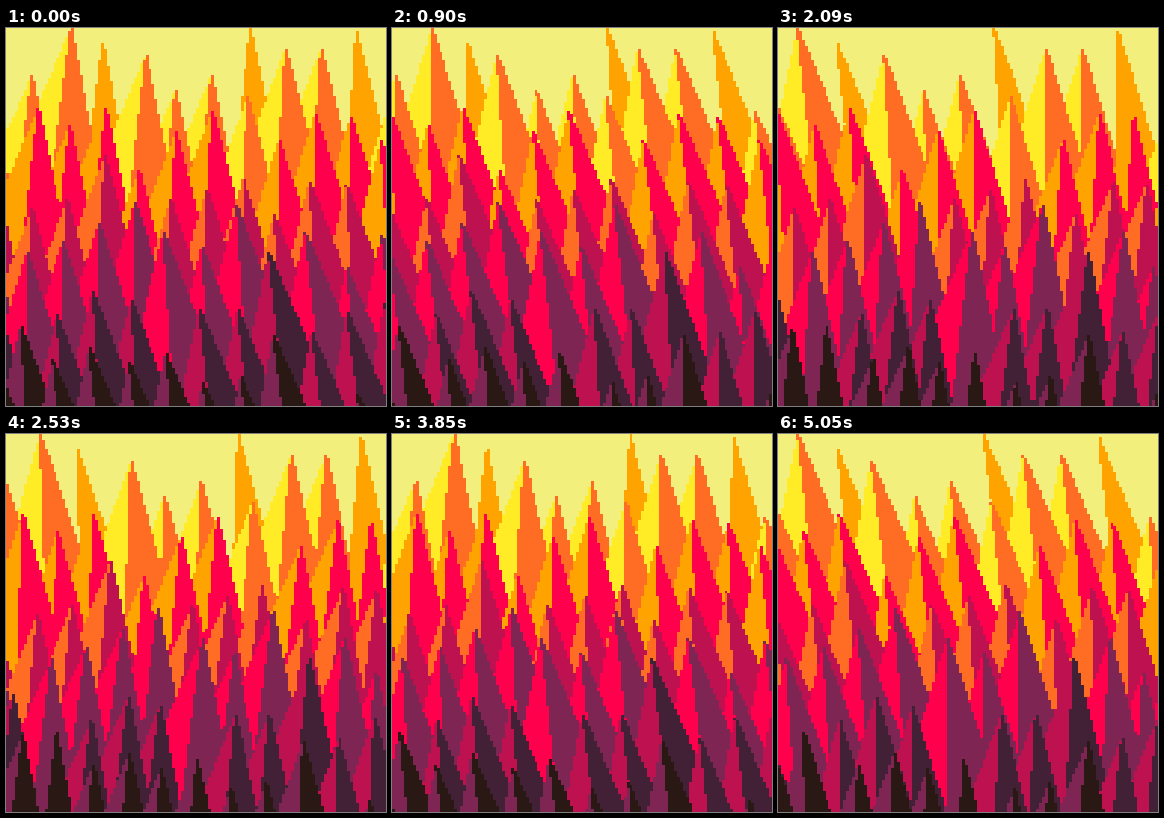
An HTML page with a canvas for the animation above (5.15 s loop, 380 by 378 pixels).

```html
<!DOCTYPE html>
<html>
<head>
<meta charset="utf-8">
<style>
  html, body { margin: 0; width: 100%; height: 100%; overflow: hidden; background: #f3ef7d; }
  canvas { display: block; width: 380px; height: 378px; image-rendering: pixelated; }
</style>
</head>
<body>
<canvas id="stage" width="128" height="128"></canvas>
<script>
const LOOP = 5150, SWAY_PERIOD = 3600, SIZE = 128;
const CELL_W = 380 / SIZE, CELL_H = 378 / SIZE;
const palette = ['#f3ef7d', '#ffec27', '#ffa300', '#ff6c24', '#ff004d',
                 '#be1250', '#7e2553', '#422136', '#291814'];

// Spikes stand on a skewed lattice; each row lists its first column and the tip heights.
const rows = [
  [-1, [80, 46, 0, 16]],
  [-1, [150, 80, 97, 80, 28, 62, 46, 0]],
  [-1, [225, 180, 172, 128, 142, 103, 82, 68, 22, 20, 4]],
  [-1, [259, 225, 214, 195, 175, 172, 163, 152, 112, 85, 88, 82]],
  [-1, [300, 298, 287, 262, 272, 205, 220, 178, 187, 155, 157, 112]],
  [1, [332, 320, 335, 325, 282, 280, 223, 205, 238, 208]],
  [5, [355, 347, 307, 303, 283, 275]],
  [9, [367, 345]]
];

const spikes = rows.flatMap(([first, tips], row) => tips.map((tip, i) => {
  const col = first + i;
  const base = 211.5 + 68 * row - 19 * col;
  const layer = Math.min(7, 2 + Math.floor((base - 181) / 58.7));
  return { row, tip, base, layer, x: 5 + 36 * col + 5.7 * row, height: base - tip };
})).sort((a, b) => a.base - b.base);

const ctx = document.getElementById('stage').getContext('2d');

function span(from, to, y, color) {
  const left = Math.floor(from / CELL_W), right = Math.floor(to / CELL_W);
  ctx.fillStyle = color;
  ctx.fillRect(left, y, right - left + 1, 1);
}

function drawSpike({ row, tip, base, layer, x, height }, time) {
  const phase = (time - 885) / SWAY_PERIOD + row / 12;
  const tipX = x - 0.128 * height * Math.sin(2 * Math.PI * phase);
  const half = 0.31 * height;
  const top = Math.round(tip / CELL_H);
  const bottom = Math.min(SIZE, Math.round(base / CELL_H));
  for (let y = top; y < bottom; y++) {
    const down = (y - top) * CELL_H / height;
    const middle = tipX + (x - tipX) * down;
    span(middle - half * down, middle, y, palette[layer - 1]);
    span(middle, middle + half * down, y, palette[layer + 1]);
  }
}

function draw() {
  const time = performance.now() % LOOP;
  ctx.fillStyle = palette[0];
  ctx.fillRect(0, 0, SIZE, SIZE);
  for (const spike of spikes) drawSpike(spike, time);
  requestAnimationFrame(draw);
}
draw();
</script>
</body>
</html>
```
